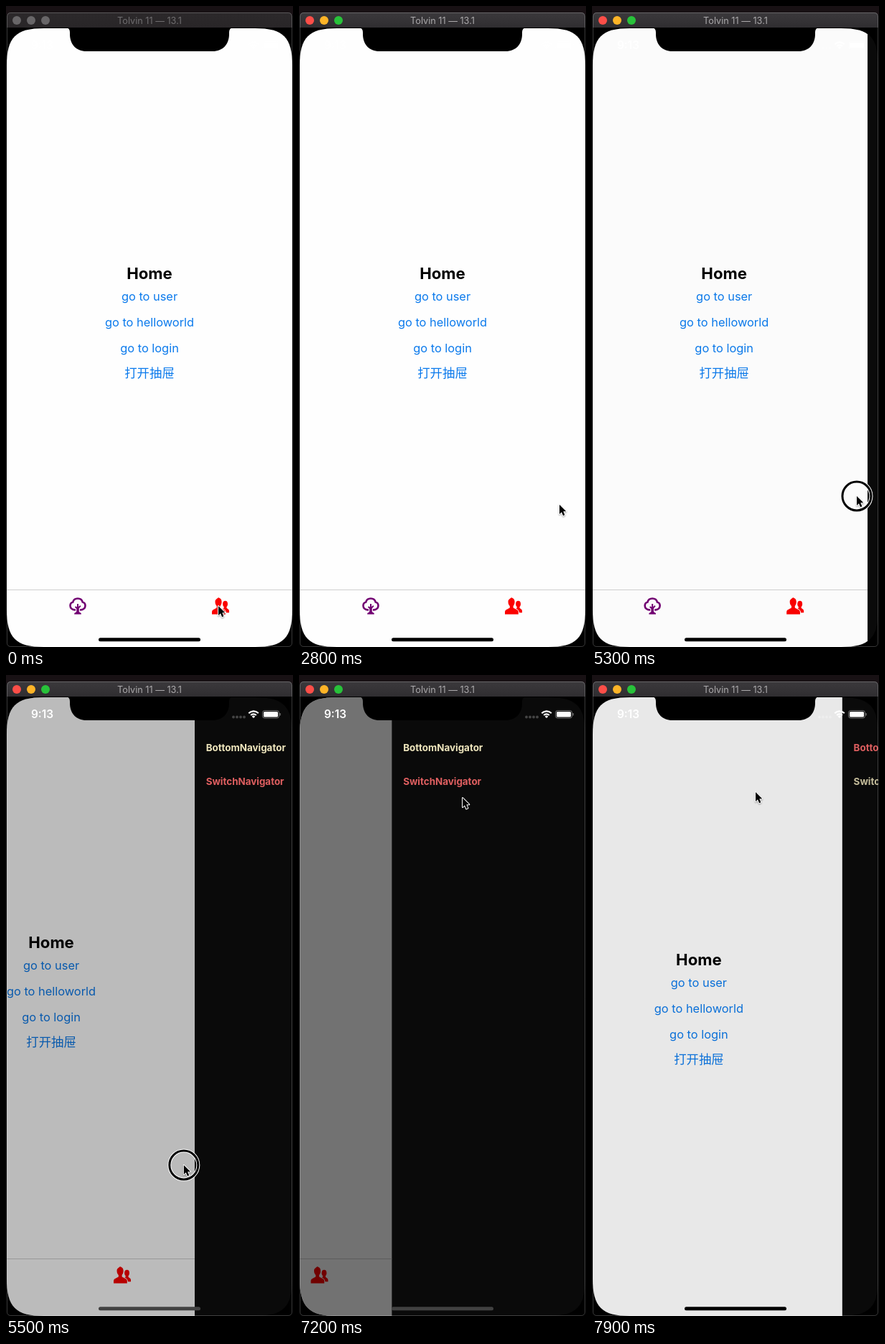
An HTML page with a canvas that plays this animation: 400x892 px, repeating every 8 s.

```html
<!DOCTYPE html>
<html lang="zh-CN">
<head>
<meta charset="utf-8">
<title>Drawer navigation</title>
<style>
html, body { margin: 0; width: 100%; height: 100%; overflow: hidden; background: #000; }
canvas { display: block; width: 400px; height: 892px; }
</style>
</head>
<body>
<canvas id="stage"></canvas>
<script>
const LOOP = 8000, STEP = 100;
const W = 400, H = 892, TOP = 31, DRAWER = 270.5;
const USER_TAP = 300, HOME_TAP = 1400, SWITCH_TAP = 7500;
const GRAB = 5200, RELEASE = 5600, CLOSE = 7740, SETTLE = 96;
const GRAB_X = 384.8;
const PURPLE = '#720072', RED = '#fb0200', BLUE = '#0b7aec';
const CREAM = '#efe6bd', CORAL = '#df5f60';
const SANS = 'Inter, "Noto Sans", sans-serif';

const canvas = document.getElementById('stage');
const ctx = canvas.getContext('2d');
const ratio = window.devicePixelRatio || 1;
canvas.width = W * ratio;
canvas.height = H * ratio;

const start = { x: 296, y: 835 };
const moves = [
  { from: 400, to: 1000, x: 145, y: 836 },
  { from: 1000, to: HOME_TAP, x: 100, y: 846 },
  { from: 1800, to: 2700, x: 363, y: 694 },
  { from: 2800, to: 5100, x: GRAB_X, y: 682 },
  { from: GRAB, to: RELEASE, x: 232, y: 682 },
  { from: 6100, to: 6600, x: 248, y: 166 },
  { from: 6800, to: 7200, x: 228, y: 171 },
  { from: 7400, to: SWITCH_TAP, x: 228, y: 163 }
];

const ease = u => u * u * u * (u * (6 * u - 15) + 10);
const mix = (a, b, k) => a + (b - a) * k;

function pointerAt(t) {
  let p = start;
  for (const m of moves) {
    if (t <= m.from) break;
    const k = ease(Math.min(1, (t - m.from) / (m.to - m.from)));
    p = { x: mix(p.x, m.x, k), y: mix(p.y, m.y, k) };
  }
  return p;
}

// The page follows the drag, then settles exponentially.
function shiftAt(t) {
  if (t <= GRAB) return 0;
  const dragged = GRAB_X - pointerAt(Math.min(t, RELEASE)).x;
  if (t <= RELEASE) return dragged;
  if (t < CLOSE) return mix(DRAWER, dragged, Math.exp((RELEASE - t) / SETTLE));
  return DRAWER * Math.exp((CLOSE - t) / SETTLE);
}

const pressedAt = t => (t > GRAB && t < RELEASE) ||
  [USER_TAP, HOME_TAP, SWITCH_TAP].some(tap => t >= tap && t < tap + STEP);

function text(str, x, y, font, color, align = 'center') {
  ctx.font = font;
  ctx.fillStyle = color;
  ctx.textAlign = align;
  ctx.fillText(str, x, y);
}

function rect(x, y, w, h, color, r = 0) {
  ctx.fillStyle = color;
  ctx.beginPath();
  ctx.roundRect(x, y, w, h, r);
  ctx.fill();
}

function dot(x, y, r, color) {
  ctx.fillStyle = color;
  ctx.beginPath();
  ctx.arc(x, y, r, 0, Math.PI * 2);
  ctx.fill();
}

// Rounded rectangle with continuous-curvature corners
function screenPath(l, t, r, b, e = 52, c = 12.5) {
  ctx.beginPath();
  ctx.moveTo(l + e, t);
  ctx.lineTo(r - e, t);
  ctx.bezierCurveTo(r - c, t, r, t + c, r, t + e);
  ctx.lineTo(r, b - e);
  ctx.bezierCurveTo(r, b - c, r - c, b, r - e, b);
  ctx.lineTo(l + e, b);
  ctx.bezierCurveTo(l + c, b, l, b - c, l, b - e);
  ctx.lineTo(l, t + e);
  ctx.bezierCurveTo(l, t + c, l + c, t, l + e, t);
}

const crown = new Path2D('M9 17.3C5 17.6 1.5 15.5 1.5 11.8 1.5 9 3 7.2 5.2 6.6 6 3.2 8.6 1.5 12 1.5S18 3.2 18.8 6.6C21 7.2 22.5 9 22.5 11.8 22.5 15.5 19 17.6 15 17.3');
const trunk = new Path2D('M11 9H13V13L15.3 11 16.4 12.5 13.8 15.2V20L16.8 22V23.4H7.2V22L10.2 20V15.7L7.9 13.7 9 12.2 11 13.5Z');
const person = new Path2D('M9 .3C11.5 1 13.6 2.5 13.6 6.2 13.6 9 12.5 10.5 11.6 12V14.3C12.4 16 18.6 16.3 18.8 20.2V23.4H0V20.2C.2 16.3 6 16 6.8 14.3V12C5.6 10.5 4.5 9 4.5 6.2 4.5 3 6.7 2 9 .3Z');
const friend = new Path2D('M18.6 4.7C20.8 4.7 22 6.3 22 8.9 22 11 21.3 12.2 20.5 13.1V14.6C21.2 16.1 24 16.2 24 19V21.2H20C19.8 18 17.4 16.2 15.4 15.2L16.7 14.5V13.1C15.8 12.2 15.1 11 15.1 8.9 15.1 6.3 16.4 4.7 18.6 4.7Z');
const arrow = new Path2D('M0 0V13L3 10.2 5.1 15.3 7.4 14.3 5.3 9.3H9.3Z');
const notch = new Path2D('M84 30Q89 31 89 37V39C89 53.5 98 63 112 63H288C302 63 311 53.5 311 39V37Q311 31 316 30Z');

function icon(x, draw) {
  ctx.save();
  ctx.translate(x, 823);
  draw();
  ctx.restore();
}

function tabBar(userActive) {
  rect(0, 812, W, 1, '#cfcfcf');
  icon(88, () => {
    ctx.strokeStyle = ctx.fillStyle = userActive ? RED : PURPLE;
    ctx.lineWidth = 2.6;
    ctx.stroke(crown);
    ctx.fill(trunk);
  });
  icon(287, () => {
    ctx.fillStyle = userActive ? PURPLE : RED;
    ctx.fill(person);
    ctx.fill(friend);
  });
}

function heading(str, y) {
  text(str, 200, y, `700 22.2px ${SANS}`, '#000');
}

function homeContent(dy) {
  const font = `400 16.4px ${SANS}`;
  heading('Home', 380 + dy);
  ['go to user', 'go to helloworld', 'go to login'].forEach((label, i) =>
    text(label, 200, 410 + i * 36.2 + dy, font, BLUE));
  text('打开抽屉', 200, 517 + dy, '400 17.4px "Noto Sans CJK SC", "Noto Sans CJK", sans-serif', BLUE);
}

function page(t, shift) {
  const userActive = t > USER_TAP && t <= HOME_TAP;
  const switched = t >= CLOSE;
  ctx.save();
  ctx.translate(-shift, 0);
  rect(0, TOP, W, H, '#fefefe');
  if (userActive) heading('User', 450.5);
  else homeContent(switched ? 23.7 : 0);
  if (!switched) tabBar(userActive);
  ctx.restore();
  if (!shift) return;

  const edge = W - shift;
  const shade = 0.57 * Math.max(0, shift / DRAWER - 0.04);
  rect(0, TOP, edge, H, `rgba(0,0,0,${shade})`);
  rect(edge, TOP, shift, H, '#0a0a0a');
  const font = `700 13.4px ${SANS}`;
  text('BottomNavigator', edge + 15.7, 105.5, font, switched ? CORAL : CREAM, 'left');
  text('SwitchNavigator', edge + 15.7, 152.7, font, switched ? '#c5bd9b' : CORAL, 'left');
}

function statusBar() {
  text('9:13', 50.5, 60.3, `600 15.4px ${SANS}`, '#fff');
  for (let i = 0; i < 4; i++) dot(317 + i * 5, 58.5, 1.9, 'rgba(255,255,255,.24)');
  ctx.strokeStyle = '#fff';
  ctx.lineWidth = 2.2;
  for (const r of [5.2, 9.2]) {
    ctx.beginPath();
    ctx.arc(345, 59.5, r, -Math.PI * 0.76, -Math.PI * 0.24);
    ctx.stroke();
  }
  ctx.fillStyle = '#fff';
  ctx.beginPath();
  ctx.moveTo(345, 60);
  ctx.arc(345, 60, 3.2, -Math.PI * 0.76, -Math.PI * 0.24);
  ctx.fill();
  ctx.strokeStyle = 'rgba(255,255,255,.4)';
  ctx.lineWidth = 1;
  ctx.beginPath();
  ctx.roundRect(357.5, 49.5, 23, 10.5, 3);
  ctx.stroke();
  rect(359, 51, 20, 7.5, '#fff', 1.6);
  rect(381.5, 53, 1.3, 3.6, 'rgba(255,255,255,.45)', 0.6);
}

function titleBar(active) {
  rect(0, 0, W, 12, '#181114');
  const shade = ctx.createLinearGradient(0, 9, 0, 30);
  shade.addColorStop(0, active ? '#3b393c' : '#2c292b');
  shade.addColorStop(1, active ? '#302e31' : '#292628');
  rect(1, 9, 398, 21, shade, [5, 5, 0, 0]);
  const lights = active ? ['#fc4e48', '#fdb427', '#28c23a'] : Array(3).fill('#686668');
  lights.forEach((color, i) => dot(15 + i * 20, 20, 6, color));
  text('Tolvin 11 — 13.1', 200, 24.7, `400 12.7px ${SANS}`, active ? '#aba9ab' : '#6f6d6f');
}

function windowEdge() {
  ctx.strokeStyle = 'rgba(255,255,255,.22)';
  ctx.lineWidth = 1;
  ctx.beginPath();
  ctx.roundRect(1.5, 9.5, 397, 882, 5);
  ctx.stroke();
}

function pointer({ x, y }, pressed) {
  if (pressed) {
    ctx.lineWidth = 5;
    ctx.strokeStyle = '#fff';
    ctx.beginPath();
    ctx.arc(x, y, 20, 0, Math.PI * 2);
    ctx.stroke();
    ctx.lineWidth = 3;
    ctx.strokeStyle = '#000';
    ctx.stroke();
  }
  ctx.save();
  ctx.translate(x, y);
  ctx.shadowColor = 'rgba(0,0,0,.35)';
  ctx.shadowBlur = 2 * ratio;
  ctx.shadowOffsetY = ratio;
  ctx.lineJoin = 'round';
  ctx.lineWidth = 2;
  ctx.strokeStyle = '#fff';
  ctx.stroke(arrow);
  ctx.shadowColor = 'transparent';
  ctx.fillStyle = '#000';
  ctx.fill(arrow);
  ctx.restore();
}

function draw(t) {
  const shift = shiftAt(t);
  ctx.setTransform(ratio, 0, 0, ratio, 0, 0);
  rect(0, 0, W, H, '#000');
  titleBar(t >= STEP);

  ctx.save();
  screenPath(1, TOP, W - 1, H);
  ctx.clip();
  page(t, shift);
  ctx.fillStyle = '#000';
  ctx.fill(notch);
  statusBar();
  rect(129, 879.3, 142, 5, shift > DRAWER / 2 ? '#414141' : '#000', 2.5);
  ctx.restore();

  windowEdge();
  pointer(pointerAt(t), pressedAt(t));
}

function tick() {
  const t = performance.now() % LOOP;
  draw(Math.floor(t / STEP) * STEP);
  requestAnimationFrame(tick);
}
tick();
</script>
</body>
</html>
```
